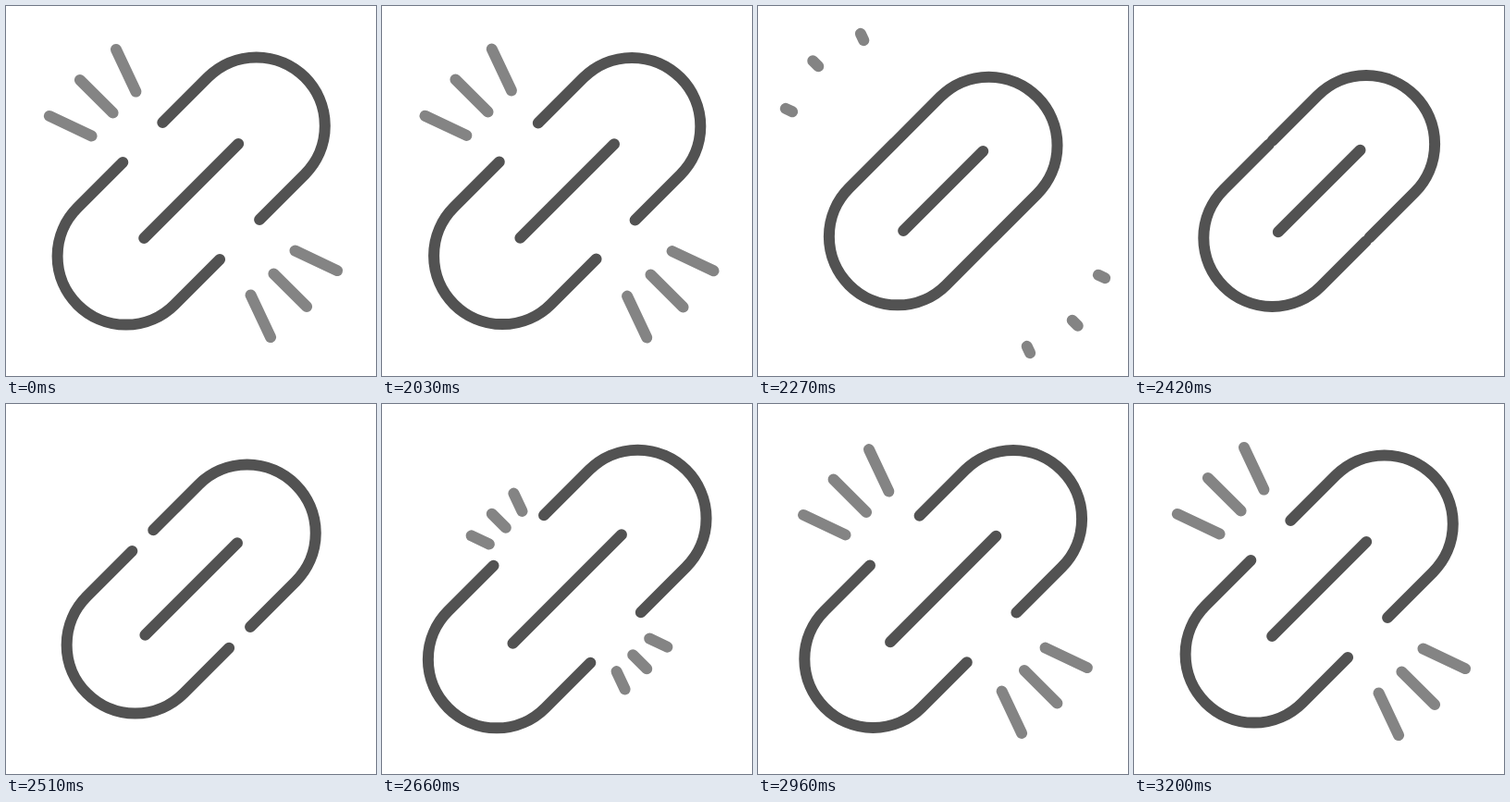
Recreate the animation shown at these times as an HTML page. Size 400x400 px, loop 3230 ms.

```html
<!DOCTYPE html>
<html lang="en">
<head>
<meta charset="utf-8">
<title>Breaking link</title>
<style>
  html, body { margin: 0; width: 100%; height: 100%; overflow: hidden; background: #fff; }
  svg { display: block; width: 100%; height: 100%; }
  path { fill: none; stroke-width: 12; stroke-linecap: round; }
</style>
</head>
<body>
<svg viewBox="0 0 400 400">
  <path id="rays" stroke="#848484"/>
  <path id="link" stroke="#525252" transform="translate(200.2 200) rotate(-45)"/>
</svg>
<script>
const LOOP = 3230;
const RADIUS = 74.1;
const ARM = 69.3;
const rays = document.getElementById('rays');
const link = document.getElementById('link');

const progress = (t, from, to) => Math.min(1, Math.max(0, (t - from) / (to - from)));
const smooth = p => (1 - Math.cos(Math.PI * p)) / 2;
const easeOut = p => 1 - (1 - p) ** 2;
const mix = (a, b, p) => a + (b - a) * p;

// Rest, squeeze shut, spring apart, settle back to rest.
function spring(t, rest, shut, open) {
  if (t < 2335) return mix(rest, shut, smooth(progress(t, 2000, 2335)));
  if (t < 2820) return mix(shut, open, smooth(progress(t, 2335, 2722)));
  return mix(open, rest, smooth(progress(t, 2820, 3200)));
}

function linkPath(t) {
  const centre = spring(t, 70.5, 47.2, 78.1) * Math.SQRT2;
  const bar = spring(t, 51, 42.3, 59.8) * Math.SQRT2;
  const half = side => {
    const end = side * (centre - ARM), bend = side * centre, r = side * RADIUS;
    return `M${end} ${-r}H${bend}A${RADIUS} ${RADIUS} 0 0 1 ${bend} ${r}H${end}`;
  };
  return half(1) + half(-1) + `M${-bar} 0H${bar}`;
}

// Inner and outer ends of a ray, as distances along its track.
function raySpan(t, length) {
  if (t < 2500) {
    return [
      mix(27, length, smooth(progress(t, 2000, 2359))),
      mix(77.5, length, smooth(progress(t, 2000, 2340)))
    ];
  }
  return [27 * smooth(progress(t, 2600, 3040)), 77.5 * easeOut(progress(t, 2590, 3040))];
}

function rayPath(t) {
  const tracks = [[117, 152, 28, 110], [134.7, 134.7, 57, 57], [152, 117, 110, 28]];
  return tracks.map(([x0, y0, x1, y1]) => {
    const length = Math.hypot(x1 - x0, y1 - y0);
    const [inner, outer] = raySpan(t, length);
    if (outer - inner < 0.5) return '';
    const at = s => [mix(x0, x1, s / length), mix(y0, y1, s / length)];
    const a = at(inner), b = at(outer);
    const opposite = p => p.map(v => 405 - v);
    return `M${a}L${b}M${opposite(a)}L${opposite(b)}`;
  }).join('');
}

function draw() {
  const t = performance.now() % LOOP;
  link.setAttribute('d', linkPath(t));
  rays.setAttribute('d', rayPath(t));
  requestAnimationFrame(draw);
}
draw();
</script>
</body>
</html>
```
